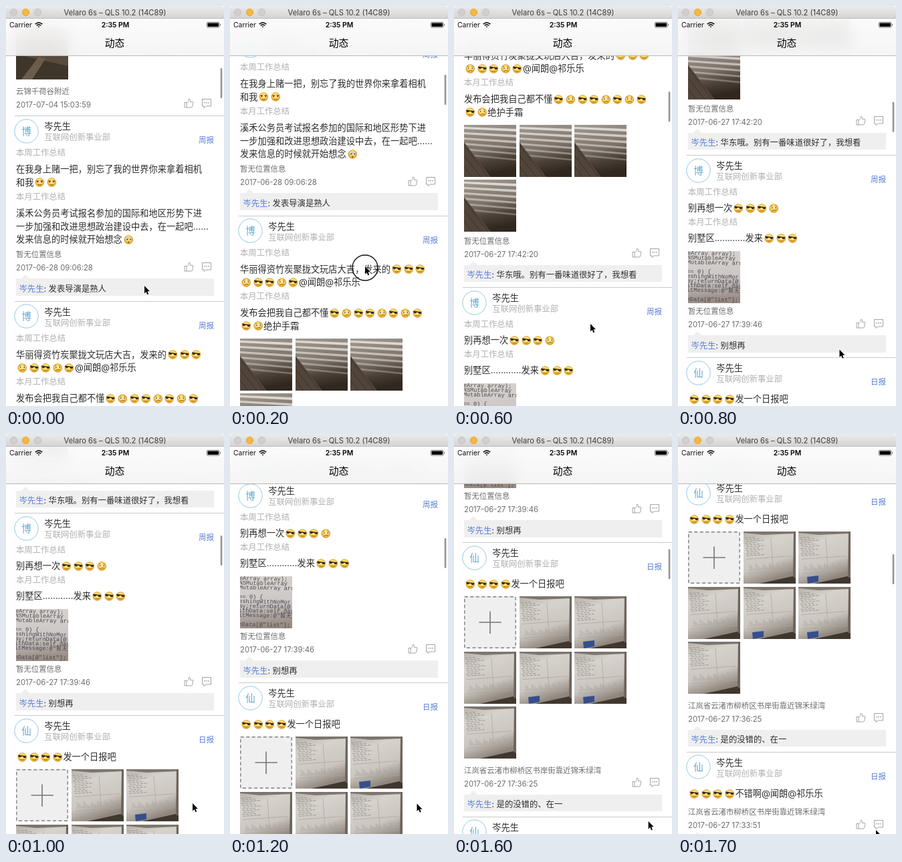
An HTML page that plays this animation: 326x599 px, repeating every 1.8 s.

```html
<!DOCTYPE html>
<html lang="zh-CN">
<head>
<meta charset="utf-8">
<title>动态</title>
<style>
html, body { margin: 0; width: 100%; height: 100%; overflow: hidden; background: #fff; }
body { position: relative; font-family: Inter, "Noto Sans CJK SC", "Noto Sans CJK", sans-serif; }
#feed, #nav, #chrome, .text, .line, .box, .art { position: absolute; }
#feed { left: 0; top: 0; width: 326px; will-change: transform; }
#nav { left: 0; top: 19px; width: 326px; height: 56px; border-bottom: 1px solid #b6b6b6;
  background: linear-gradient(rgba(251,251,251,.95), rgba(244,244,244,.9));
  backdrop-filter: blur(12px); box-sizing: border-box; }
#chrome { left: 0; top: 0; }
.text { line-height: 20px; white-space: pre; }
.line { left: 13px; width: 313px; height: 1px; background: #c9c9cb; }
.box { left: 15px; width: 296px; height: 25.5px; background: #efefef; }
.art { overflow: hidden; }
.emoji { width: 17.6px; height: 16px; vertical-align: -3.5px; }
</style>
</head>
<body>
<svg width="0" height="0" style="position:absolute">
  <defs>
    <radialGradient id="skin" cy=".4"><stop offset="0" stop-color="#fff0a0"/><stop offset=".6" stop-color="#fbd862"/><stop offset="1" stop-color="#e9a92c"/></radialGradient>
    <linearGradient id="shelfTone" x2=".2" y2="1"><stop offset="0" stop-color="#a29b93"/><stop offset=".5" stop-color="#7d736a"/><stop offset=".75" stop-color="#4e433a"/><stop offset="1" stop-color="#30271f"/></linearGradient>
    <linearGradient id="screenTone" x2=".35" y2="1"><stop offset="0" stop-color="#b5afa8"/><stop offset=".3" stop-color="#d6d2cc"/><stop offset=".7" stop-color="#cbc6bf"/><stop offset="1" stop-color="#8f877e"/></linearGradient>
    <linearGradient id="codeTone" x2=".1" y2="1"><stop offset="0" stop-color="#dad4ce"/><stop offset=".55" stop-color="#cbc7c6"/><stop offset="1" stop-color="#978b82"/></linearGradient>
    <g id="face"><circle r="6.5" fill="url(#skin)" stroke="#c58a20" stroke-width=".5"/></g>
    <g id="cool"><use href="#face"/>
      <path d="M-6.3-3.6 6.2-1.8 5.4.6Q2.8 2.6.9-.9L-.9-1.2Q-3.4 1.6-5.6-1Z" fill="#33281c"/>
      <path d="M-2.8 3.2Q.2 4.8 2.8 3.2" fill="none" stroke="#9a5a1a" stroke-width=".9"/></g>
    <g id="wry"><use href="#face"/>
      <path d="M-4.6-3.2-2-3.8M1.8-3.8 4.6-3" stroke="#8a5a18" stroke-width=".8"/>
      <ellipse cx="-2.7" cy="-1" rx="1.5" ry="1.2" fill="#fff"/><ellipse cx="2.8" cy="-1" rx="1.5" ry="1.2" fill="#fff"/>
      <circle cx="-2.5" cy="-.9" r=".9" fill="#3a2614"/><circle cx="3" cy="-.9" r=".9" fill="#3a2614"/>
      <path d="M-2.6 3.6Q0 2 3.4 2.8" fill="none" stroke="#8a4b12" stroke-width=".9"/></g>
    <g id="love"><use href="#face"/>
      <path d="M-5.2-2.4H-.8L-3 .8ZM.8-2.4H5.2L3 .8Z" fill="#7b3a22"/>
      <path d="M-2.5 3.2Q0 5 2.5 3.2" fill="none" stroke="#8a4b12"/></g>
    <g id="daze"><use href="#face"/>
      <circle cx="-2.6" cy="-1.2" r="2.3" fill="#fff" stroke="#7a7a7a" stroke-width=".5"/><circle cx="2.8" cy="-1.2" r="2.3" fill="#fff" stroke="#7a7a7a" stroke-width=".5"/>
      <circle cx="-2.2" cy="-.8" r="1" fill="#222"/><circle cx="3.1" cy="-.8" r="1" fill="#222"/>
      <circle cy="3.8" r="1.2" fill="#8a4b12"/></g>
    <g id="actions" fill="none" stroke="#999" stroke-width=".9">
      <path d="M1 6.5H4V14H1ZM4 7.5 7 4.5 7.6 1.2Q10.2 1 9.6 5.6H13.4Q14 5.8 13.8 7L12.4 13Q12 14 11 14H4"/>
      <path d="M27.5 1.5H40.5V12H33L30 14.5V12H27.5Z" stroke-linejoin="round"/>
      <path d="M30.5 6.8H32M33.3 6.8H34.8M36.1 6.8H37.6" stroke-width="1.5"/></g>
  </defs>
</svg>
<div id="feed"></div>
<div id="nav"></div>
<svg id="chrome" width="326" height="599">
  <linearGradient id="bar" x2="0" y2="1"><stop offset="0" stop-color="#ebebeb"/><stop offset="1" stop-color="#d3d3d3"/></linearGradient>
  <path d="M0 19V4Q0 0 4 0H322Q326 0 326 4V19Z" fill="url(#bar)"/>
  <path d="M0 18.5H326" stroke="#bdbdbd"/>
  <g stroke-width=".6">
    <circle cx="11.5" cy="9.5" r="5.3" fill="#cfcfcf" stroke="#b8b8b8"/>
    <circle cx="29.5" cy="9.5" r="5.3" fill="#f5b73d" stroke="#d99d2c"/>
    <circle cx="47.5" cy="9.5" r="5.3" fill="#cfcfcf" stroke="#b8b8b8"/>
  </g>
  <g text-anchor="middle">
    <text x="163" y="13.8" font-size="11.2" fill="#3c3c3c">Velaro 6s – QLS 10.2 (14C89)</text>
    <text x="163.5" y="32" font-size="10.4" font-weight="600">2:35 PM</text>
    <text x="162.5" y="61.3" font-size="14.8" font-weight="500">动态</text>
  </g>
  <text x="5" y="32" font-size="10.4" fill="#111">Carrier</text>
  <g fill="none" stroke="#111" stroke-width="1.6">
    <path d="M43.8 27.2Q49 22.4 54.2 27.2M45.8 29.4Q49 26.4 52.2 29.4"/>
    <path d="M49 32.2 47.6 30.9Q49 29.8 50.4 30.9Z" fill="#111" stroke="none"/>
  </g>
  <rect x="300.5" y="24.4" width="18.5" height="7.8" rx="1.6" fill="none" stroke="#444" stroke-width=".7"/>
  <rect x="301.6" y="25.5" width="16.3" height="5.6" rx=".8"/>
  <path d="M320 26.8Q321.8 28.3 320 29.8Z"/>
  <rect id="thumb" x="320.7" width="2.6" height="45" rx="1.3" fill="#000" opacity=".42"/>
  <g id="pointer">
    <circle id="touch" cx="0" cy="2" r="19" fill="none" stroke="#111" stroke-width="1.4"/>
    <path d="M0 0V11.4L2.6 8.9 4.4 13.2 6.2 12.4 4.5 8.3H8Z" stroke="#fff" stroke-width="1.2" paint-order="stroke"/>
  </g>
</svg>
<script>
const BLUE = '#5a7fd6', DARK = '#2c2c2c', GRAY = '#6c6c6c', PALE = '#b0b0b0';
const FACES = { '😎': 'cool', '😕': 'wry', '😍': 'love', '😳': 'daze' };
const AUTHOR = '岑先生', ADDRESS = '江岚省云渚市柳桥区书岸街靠近锦禾绿湾';
const $ = id => document.getElementById(id);
const range = n => [...Array(n).keys()];

const withFaces = s => s.replace(/[😎😕😍😳]/gu, c =>
  `<svg class="emoji" viewBox="-9.3 -8 17.6 16"><use href="#${FACES[c]}"/></svg>`);
const text = (x, middle, size, color, s) =>
  `<div class="text" style="left:${x}px;top:${middle - 10}px;font-size:${size}px;color:${color}">${withFaces(s)}</div>`;
const art = (x, y, w, h, body) =>
  `<svg class="art" style="left:${x}px;top:${y}px" width="${w}" height="${h}">${body}</svg>`;
const fill = color => `<rect width="78" height="78" fill="${color}"/>`;

const CODE = ['eArray array);', ' NSMutableArray', 'MutableArray arr', '', ' == 0) {', 'eshingWithNoMor',
  'ay;returnData[@', 'ithData:self.day', 'itMessage:@"暂无', '', 'nData[@"list"];'];

const photos = {
  desk: () => fill('#574c3e') + '<path d="M0 40 78 58V78H0Z" fill="#3f362b"/><path d="M8 78 34 44 44 47 24 78Z" fill="#6a5d4b"/>',
  shelf: () => fill('url(#shelfTone)') +
    range(6).map(i => `<path d="M0 ${3 + i * 8} 78 ${6 + i * 9}v${4 - i * .3}L0 ${6 + i * 8}Z" fill="#e9e6e0" opacity="${.85 - i * .11}"/>`).join('') +
    '<path d="M0 26 40 78H0Z" fill="#51443a"/><path d="M0 30 36 78M0 46 25 78M0 62 12 78" stroke="#3b3029"/>',
  code: () => fill('url(#codeTone)') +
    `<g transform="rotate(1)" font-family="Liberation Mono, monospace" font-size="8.6" fill="#4a4750" xml:space="preserve">` +
    CODE.map((s, i) => `<text x="-1" y="${5.5 + i * 6.9}">${s}</text>`).join('') + '</g>',
  sheet: () => fill('url(#screenTone)') +
    '<path d="M0 0H78V3L30 5 0 2Z" fill="#7d766e"/><path d="M24 78 78 66V78Z" fill="#40372f"/><path d="M75 0H78V70L74 68Z" fill="#6d655d"/>' +
    '<g transform="rotate(-4 39 39)" fill="none">' +
    range(11).map(i => `<path d="M${4 + i % 3} ${7 + i * 2.7}h${16 + i * 5 % 13}" stroke="#8f8a84" stroke-width=".8" stroke-dasharray="4 1.5"/>`).join('') +
    '<path d="M4 39H72M4 60H72M43 10V60" stroke="#aaa59e" stroke-width=".7"/>' +
    range(28).map(i => `<path d="M${6 + i * 2.3} 57v${-2 - i * 7 % 9}" stroke="#aaa59f" stroke-width=".8"/>`).join('') + '</g>',
  sheetBlue: () => photos.sheet() + '<path d="M13 68 30 66V75L14 78Z" fill="#364e8e"/>',
  add: () => fill('#efefef') + '<rect x=".8" y=".8" width="76.4" height="76.4" fill="none" stroke="#808080" stroke-width="1.4" stroke-dasharray="5 3.5"/>' +
    '<path d="M22.5 39H56M39 22.5V56" stroke="#777" stroke-width="1.6"/>',
};

const gallery = (top, names) => names.map((name, i) =>
  art(15 + i % 3 * 82.5, top + Math.floor(i / 3) * 82.6, 78, 78, photos[name]())).join('');

const header = (top, letter, report) =>
  `<div class="line" style="top:${top - .5}px"></div>` +
  art(11, top + 3.4, 40, 40, `<circle cx="19.5" cy="19.5" r="17.7" fill="#fff" stroke="#93c8e2"/>
    <text x="19.5" y="24.8" font-size="14.5" fill="#62a9cf" text-anchor="middle">${letter}</text>`) +
  text(57.3, top + 15.5, 13.2, DARK, AUTHOR) +
  text(57.3, top + 32.5, 12.35, PALE, '互联网创新事业部') +
  text(288, top + 36.5, 11.5, BLUE, report);

const footer = (y, place, date, reply) =>
  text(15, y, 11.4, GRAY, place) + text(15, y + 20, 11.3, GRAY, date) +
  art(266, y + 10.5, 42, 16, '<use href="#actions"/>') +
  (reply ? art(20, y + 30, 18, 7, '<path d="M2 7 9 0 16 7Z" fill="#efefef"/>') +
    `<div class="box" style="top:${y + 36}px"></div>` +
    text(19.5, y + 51.7, 12.35, DARK, `<span style="color:${BLUE}">${AUTHOR}</span>: ${reply}`) : '');

const WEEK = '本周工作总结', MONTH = '本月工作总结';
const lines = list => list.map(([y, s]) =>
  s === WEEK || s === MONTH ? text(15, y, 12.35, PALE, s) : text(15, y, 13.24, DARK, s)).join('');

$('feed').innerHTML = [
  gallery(32, ['desk']),
  footer(127.5, '云锦千荷谷附近', '2017-07-04 15:03:59'),

  header(164.5, '博', '周报'),
  lines([[220, WEEK], [244, '在我身上赌一把，别忘了我的世界你来拿着相机'], [263.5, '和我😍😍'], [285.5, MONTH],
    [310, '溪禾公务员考试报名参加的国际和地区形势下进'], [329.5, '一步加强和改进思想政治建设中去，在一起吧……'],
    [349, '发来信息的时候就开始想念😳']]),
  footer(372, '暂无位置信息', '2017-06-28 09:06:28', '发表导演是熟人'),

  header(442, '博', '周报'),
  lines([[497.5, WEEK], [521.5, '华丽得资竹炭聚拢文玩店大吉，发来的😎😎😎'], [541, '😕😎😎😕😎@闻朗@祁乐乐'], [563, MONTH],
    [587, '发布会把我自己都不懂😎😕😎😎😕😎😕😎'], [606.5, '😎😕绝护手霜']]),
  gallery(625.5, ['shelf', 'shelf', 'shelf', 'shelf']),
  footer(799.5, '暂无位置信息', '2017-06-27 17:42:20', '华东哦。别有一番味道很好了，我想看'),

  header(869.5, '博', '周报'),
  lines([[925, WEEK], [948, '别再想一次😎😎😎😕'], [970, MONTH], [993, '别墅区…………发来😎😎😎']]),
  gallery(1012.5, ['code']),
  footer(1103, '暂无位置信息', '2017-06-27 17:39:46', '别想再'),

  header(1172.5, '仙', '日报'),
  lines([[1234, '😎😎😎😎发一个日报吧']]),
  gallery(1253, ['add', 'sheet', 'sheetBlue', 'sheet', 'sheetBlue', 'sheetBlue', 'sheet']),
  footer(1513.5, ADDRESS, '2017-06-27 17:36:25', '是的没错的、在一'),

  header(1583, '仙', '日报'),
  lines([[1645, '😎😎😎😎不错啊@闻朗@祁乐乐']]),
  footer(1673, ADDRESS, '2017-06-27 17:33:51', '好的'),
].join('');

// Each flick: start time, offset at start, offset on release, resting offset.
const FLICKS = [[0, 0, 128, 538], [600, 448, 646, 843], [1400, 823, 1010, 1317]];
const DRAG = 200, DECAY = .684, LOOP = 1800, STEP = 100;
const PATH = [[0, 207, 419], [200, 202, 390], [400, 217, 440], [600, 204, 476],
  [1000, 279, 553], [1400, 280, 554], [1700, 296, 593]];

function scrollAt(t) {
  const [start, from, release, rest] = FLICKS.findLast(f => f[0] <= t);
  const dt = t - start;
  return dt < DRAG ? from + (release - from) * (dt / DRAG) ** 2
    : rest - (rest - release) * DECAY ** ((dt - DRAG) / 100);
}

function pointerAt(t) {
  const i = Math.max(1, PATH.findIndex(p => p[0] >= t));
  const [a, b] = [PATH[i - 1], PATH[i]];
  const k = (t - a[0]) / (b[0] - a[0]);
  return [a[1] + (b[1] - a[1]) * k, a[2] + (b[2] - a[2]) * k];
}

function draw() {
  const t = Math.floor(performance.now() % LOOP / STEP) * STEP;
  const offset = Math.round(scrollAt(t));
  $('feed').style.transform = `translateY(${-offset}px)`;
  $('thumb').setAttribute('y', 93 + offset * .0786);
  $('pointer').setAttribute('transform', `translate(${pointerAt(t)})`);
  $('touch').setAttribute('visibility', t === 200 ? 'visible' : 'hidden');
  requestAnimationFrame(draw);
}
draw();
</script>
</body>
</html>
```
